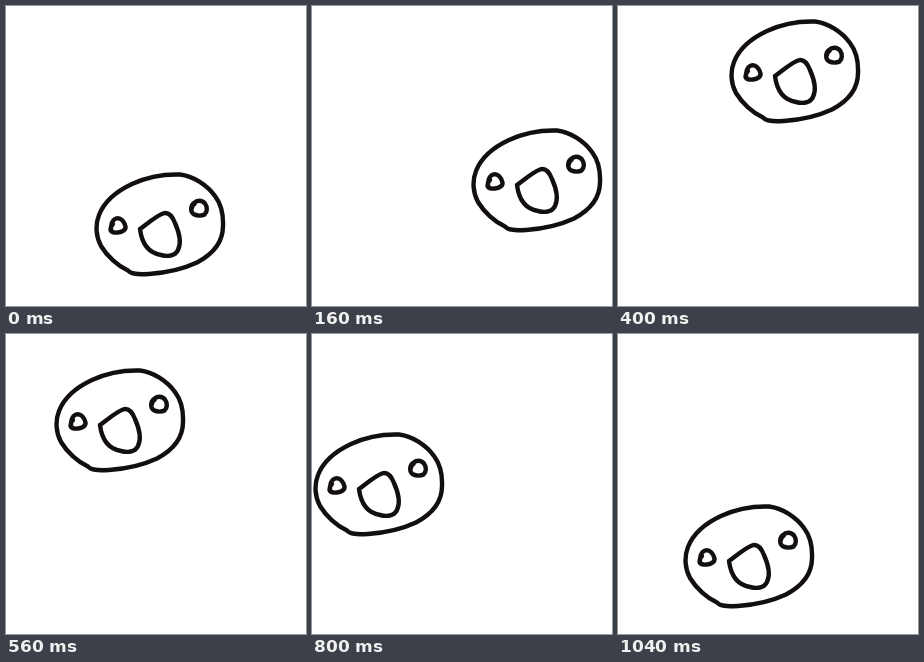
Animation of 300 by 300 pixels, one loop 1.14 s. Source, as an HTML page:

```html
<!DOCTYPE html>
<html lang="en">
<head>
<meta charset="utf-8">
<title>Bouncing face</title>
<style>
  html, body { margin: 0; width: 100%; height: 100%; overflow: hidden; background: #fff; }
  svg { display: block; width: 100vw; height: 100vh; }
  .face {
    fill: none;
    stroke: #120e12;
    stroke-width: 4.4;
    stroke-linecap: round;
    stroke-linejoin: round;
    animation: orbit 1140ms step-end infinite;
  }
  /* One held pose every 80 ms; the last one stays 100 ms */
  @keyframes orbit {
    0%      { transform: translate(0, 0); }
    7.017%  { transform: translate(42px, -15px); }
    14.035% { transform: translate(71px, -44px); }
    21.052% { transform: translate(59px, -89px); }
    28.07%  { transform: translate(44px, -125px); }
    35.087% { transform: translate(23px, -153px); }
    42.105% { transform: translate(-9px, -148px); }
    49.122% { transform: translate(-40px, -132px); }
    56.14%  { transform: translate(-62px, -114px); }
    63.157% { transform: translate(-78px, -92px); }
    70.175% { transform: translate(-87px, -68px); }
    77.192% { transform: translate(-79px, -38px); }
    84.21%  { transform: translate(-55px, -13px); }
    91.228%, 100% { transform: translate(-23px, 4px); }
  }
</style>
</head>
<body>
<svg viewBox="0 0 300 300">
  <g class="face">
    <!-- head -->
    <path d="M122 264.5 C112 260 101 250 95 240 C90 231 89 219 93 209 C98 196 111 185 126 178
             C141 171 158 168 174 168.500 C187 170 201 179 209 190 C215 198 217.500 208 217 220
             C217 236 207 248 191 256.500 C177 263 158 267 143 268 C132 268.500 125 268.500 122 264.5"/>
    <!-- left eye -->
    <path d="M105.5 225.500 C104 220 106 214 110 212.5 C115 211 118.500 216 119.500 220.500
             C120 224 116 226 112 226.500 C108 227 104.500 226 104.500 223.500 C104.500 221 106 219 107 218"/>
    <!-- right eye -->
    <path d="M188 208.500 C184 206 184.500 200 188 197 C191 194 196 194 199 197.500
             C201.500 201 201.500 206 198.500 208.500 C196 210 191 210 188.500 208.500 M186 202 C186 200 187 199 188.500 198"/>
    <!-- mouth -->
    <path d="M134 223 C141 218 150 210 157 207.500 C163 205.500 167 212 169 217
             C173 226 175.500 237 172 244 C169 250.500 161 250.500 155 249 C143 247 136 239 134 223"/>
  </g>
</svg>
</body>
</html>
```
